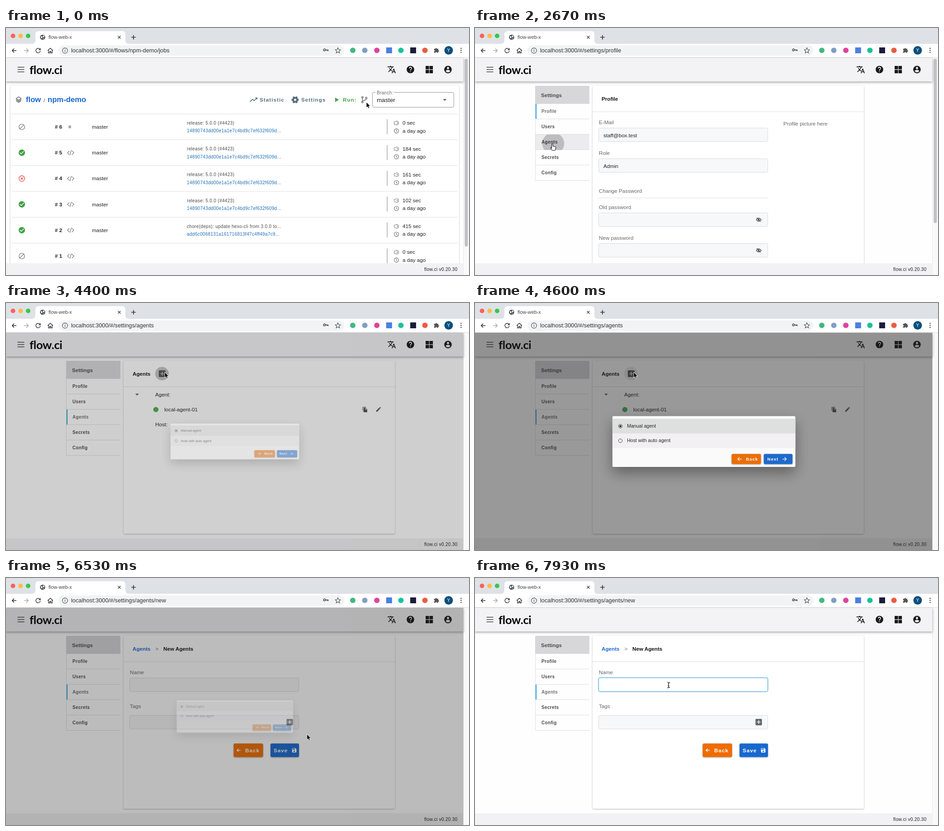
These frames come from a looping animation (1024x547 px, 8 s). An HTML page:

```html
<!DOCTYPE html>
<html lang="en">
<head>
<meta charset="utf-8">
<title>flow-web-x</title>
<style>
html, body { margin: 0; width: 100%; height: 100%; overflow: hidden; background: #fff; }
svg { display: block; width: 1024px; height: 547px; }
text { font: 11.67px "Liberation Sans", Arial, sans-serif; fill: #222; white-space: pre; }
text.cap { font-size: 10px; letter-spacing: .033em; }
text.b { font-weight: 700; }
text.sp { font-weight: 700; letter-spacing: .0893em; }
text.dense { font-size: 10.83px; }
text.url { font-size: 12.8px; fill: #333; }
text.label { fill: #666; }
text.logo { font: 700 25.5px Lato, sans-serif; letter-spacing: -.3px; fill: #000; }
.card { filter: drop-shadow(0 1px 1.5px rgba(0,0,0,.3)); }
.bar { filter: drop-shadow(0 2px 2.5px rgba(0,0,0,.36)); }
.pop { filter: drop-shadow(0 4px 5px rgba(0,0,0,.32)); }
.btn { filter: drop-shadow(0 1px 1.5px rgba(0,0,0,.35)); }

.step, .tween { animation: 8s infinite; }
.step { opacity: 0; animation-timing-function: step-end; }
.tween { animation-timing-function: linear; }

.list { animation-name: list; }
.profile { animation-name: profile; }
.agents { animation-name: agents; }
.new { animation-name: new; }
@keyframes list { 0% { opacity: 1 } 21.25%, 100% { opacity: 0 } }
@keyframes profile { 0% { opacity: 0 } 21.25% { opacity: 1 } 35%, 100% { opacity: 0 } }
@keyframes agents { 0% { opacity: 0 } 35% { opacity: 1 } 81.6%, 100% { opacity: 0 } }
@keyframes new { 0% { opacity: 0 } 81.6%, 100% { opacity: 1 } }

.account { animation-name: account; }
@keyframes account { 0%, 9.5% { opacity: 0 } 10.6%, 21.3% { opacity: 1 } 23%, 100% { opacity: 0 } }
.menu { animation-name: menu; transform-origin: 1001px 116px; }
@keyframes menu {
  0%, 11.8% { opacity: 0; transform: scale(.6) }
  12.6% { opacity: .8; transform: scale(.92) }
  14%, 20.6% { opacity: 1; transform: none }
  22.6%, 100% { opacity: 0; transform: none }
}
.item-hover { animation-name: itemHover; }
@keyframes itemHover { 0% { opacity: 0 } 15.6%, 100% { opacity: 1 } }
.ripple-menu { animation-name: rippleMenu; transform-origin: 971px 173px; }
@keyframes rippleMenu {
  0%, 18% { opacity: 0; transform: scale(.3) }
  19.1% { opacity: 1; transform: none }
  20.8% { opacity: 1; transform: scale(3.4) }
  22.6%, 100% { opacity: 0; transform: scale(3.6) }
}
.side-hover { animation-name: sideHover; }
@keyframes sideHover { 0%, 29.5% { opacity: 0 } 30.6%, 44.4% { opacity: 1 } 46%, 100% { opacity: 0 } }
.ripple-side { animation-name: rippleSide; transform-origin: 173px 256px; }
@keyframes rippleSide {
  0%, 32.4% { opacity: 0; transform: scale(.3) }
  33.4% { opacity: 1; transform: none }
  35.3% { opacity: 1; transform: scale(3.8) }
  37.5%, 100% { opacity: 0; transform: scale(4) }
}
.plus-hover { animation-name: plusHover; }
@keyframes plusHover { 0%, 51.2% { opacity: 0 } 52.5%, 55% { opacity: 1 } 59%, 100% { opacity: 0 } }
.shade { animation-name: shade; }
@keyframes shade {
  0%, 54.5% { opacity: 0 } 55% { opacity: .21 } 55.9% { opacity: .4 }
  57%, 80.9% { opacity: .46 } 82.2% { opacity: .18 } 83.4% { opacity: .05 } 84.2%, 100% { opacity: 0 }
}
.dialog { animation-name: dialog; transform-origin: 506px 306.5px; }
@keyframes dialog {
  0%, 54.5% { opacity: 0; transform: scale(.5) }
  55% { opacity: .42; transform: scale(.683) }
  55.9% { opacity: .84; transform: scale(.92) }
  58.2%, 80.5% { opacity: 1; transform: none }
  81.4% { opacity: .3; transform: scale(.65) }
  82.6%, 100% { opacity: 0; transform: scale(.5) }
}
.focus { animation-name: focus; }
@keyframes focus { 0%, 98.1% { opacity: 0 } 98.8%, 100% { opacity: 1 } }

.cursor { animation-name: cursor; animation-timing-function: ease-in-out; }
@keyframes cursor {
  0%, .8% { transform: translate(797px, 165px) }
  9.8%, 12.2% { transform: translate(977px, 94px) }
  17%, 22% { transform: translate(975px, 177px) }
  30.5%, 43.6% { transform: translate(171px, 258px) }
  52%, 64% { transform: translate(351px, 154px) }
  75% { transform: translate(651px, 328px) }
  78.2%, 80.8% { transform: translate(664px, 346px) }
  83.4%, 87.5% { transform: translate(671px, 350px) }
  96.3%, 100% { transform: translate(428px, 237px) }
}
.arrow { animation-name: arrow; }
.hand { animation-name: hand; }
.beam { animation-name: beam; }
@keyframes arrow {
  0% { opacity: 1 } 9.3% { opacity: 0 } 21.7% { opacity: 1 } 30% { opacity: 0 }
  44.4% { opacity: 1 } 77% { opacity: 0 } 81.6% { opacity: 1 } 94.6%, 100% { opacity: 0 }
}
@keyframes hand {
  0% { opacity: 0 } 9.3% { opacity: 1 } 21.7% { opacity: 0 } 30% { opacity: 1 }
  44.4% { opacity: 0 } 77% { opacity: 1 } 81.6%, 100% { opacity: 0 }
}
@keyframes beam { 0% { opacity: 0 } 94.6%, 100% { opacity: 1 } }
</style>
</head>
<body>
<svg id="stage" viewBox="0 0 1024 547"></svg>
<script>
const BLUE = '#1868cf', ORANGE = '#ef6c00', GREEN = '#43a047', GREY = '#6b6b6b', LINE = '#dedee0';
const MAIL = 'staff@box.test';

// Icons on a 24 unit grid
const solid = {
  user: 'M12 2a10 10 0 1 0 0 20 10 10 0 0 0 0-20zm0 3a3 3 0 1 1 0 6 3 3 0 0 1 0-6zm0 14.2c-2.5 0-4.7-1.3-6-3.2 0-2 4-3.1 6-3.1s6 1.1 6 3.1c-1.3 1.9-3.5 3.2-6 3.2z',
  help: 'M12 2a10 10 0 1 0 0 20 10 10 0 0 0 0-20zm1 17h-2v-2h2zm2-7.8l-.9 1C13.5 12.9 13 13.5 13 15h-2v-.5c0-1.1.5-2.1 1.2-2.8l1.2-1.3A2 2 0 1 0 10 9H8a4 4 0 1 1 7 2.2z',
  translate: 'M12.9 15.1l-2.6-2.5C12.1 10.600 13.400 8.400 14.100 6H17V4h-7V2H8v2H1v2h11.200C11.500 7.900 10.400 9.800 9 11.400 8.100 10.300 7.300 9.200 6.700 8h-2c.7 1.600 1.700 3.200 3 4.600l-5.100 5L4 19l5-5 3.100 3.100zM18.500 10h-2L12 22h2l1.100-3h4.800L21 22h2zm-2.600 7l1.600-4.300 1.600 4.300z',
  apps: 'M2.500 2.500h9v9h-9zM12.800 2.500h9v9h-9zM2.500 12.800h9v9h-9zM12.800 12.800h9v9h-9z',
  trend: 'M16 6l2.300 2.300-4.900 4.900-4-4L2 16.600 3.400 18l6-6 4 4 6.300-6.300L22 12V6z',
  play: 'M7 4v16l13-8z',
  caret: 'M7 10l5 5 5-5z',
  check: 'M12 2a10 10 0 1 0 0 20 10 10 0 0 0 0-20zm-2 15l-5-5 1.400-1.400 3.600 3.600 7.600-7.600L19 8z',
  plus: 'M5 3h14a2 2 0 0 1 2 2v14a2 2 0 0 1-2 2H5a2 2 0 0 1-2-2V5a2 2 0 0 1 2-2zm6 4v4H7v2h4v4h2v-4h4v-2h-4V7z',
  copy: 'M16 1H4a2 2 0 0 0-2 2v14h2V3h12zM15 5H8a2 2 0 0 0-2 2v14a2 2 0 0 0 2 2h11a2 2 0 0 0 2-2V11zm-1 7V6.500l5.500 5.500z',
  pencil: 'M3 17.200V21h3.800L17.800 9.900l-3.700-3.700zM20.700 7a1 1 0 0 0 0-1.400l-2.300-2.300a1 1 0 0 0-1.400 0l-1.900 1.800 3.800 3.800z',
  save: 'M17 3H5a2 2 0 0 0-2 2v14a2 2 0 0 0 2 2h14a2 2 0 0 0 2-2V7zm-5 16a3 3 0 1 1 0-6 3 3 0 0 1 0 6zm3-10H5V5h10z',
  puzzle: 'M3 6h5a3 3 0 1 1 6 0h5v5a3 3 0 1 1 0 6v4h-5a2.500 2.500 0 0 0-5 0H3v-5a2.500 2.500 0 0 0 0-5z'
};
const outline = {
  left: 'M20 12H5M12 5l-7 7 7 7',
  right: 'M4 12h15M12 5l7 7-7 7',
  reload: 'M19 7a8.500 8.500 0 1 0 1.500 6M20.500 3v6h-6',
  home: 'M2 12L12 3l10 9M5 10v11h5v-6h4v6h5V10',
  close: 'M5 5l14 14M19 5L5 19',
  add: 'M12 3v18M3 12h18',
  burger: 'M2 5h20M2 12h20M2 19h20',
  layers: 'M12 3l9 6-9 6-9-6zM3 13l9 6 9-6M3 17l9 6 9-6',
  code: 'M8 6l-6 6 6 6M16 6l6 6-6 6M14 4l-4 16',
  branch: 'M6 7v10M18 9c0 5-9 3-11.500 8M3.500 4.500a2.500 2.500 0 1 0 5 0 2.500 2.500 0 1 0-5 0M15.500 6.500a2.500 2.500 0 1 0 5 0 2.500 2.500 0 1 0-5 0M3.500 19.500a2.500 2.500 0 1 0 5 0 2.500 2.500 0 1 0-5 0',
  ban: 'M2 12a10 10 0 1 0 20 0 10 10 0 1 0-20 0M19 5L5 19',
  fail: 'M2 12a10 10 0 1 0 20 0 10 10 0 1 0-20 0M8 8l8 8M16 8l-8 8',
  clock: 'M3 12a9 9 0 1 0 18 0 9 9 0 1 0-18 0M12 7v5l4 3',
  fast: 'M8 6a8 8 0 1 1 0 12M15 8v5l3 1M1 7h6M0 12h5M1 17h6',
  logout: 'M16 7V2H3v20h13v-5M9 12h13M18 8l4 4-4 4',
  eye: 'M1 12q11-14 22 0q-11 14-22 0M9 12a3 3 0 1 0 6 0 3 3 0 1 0-6 0M3 3l18 18',
  globe: 'M3 12a9 9 0 1 0 18 0 9 9 0 1 0-18 0',
  star: 'M12 2l3 7 7 .6-5.400 4.900L18.300 22 12 18l-6.300 4 1.700-7.500L2 9.600 9 9z',
  key: 'M3 12a4 4 0 1 0 8 0 4 4 0 1 0-8 0M11 12h11v5M17 12v4',
  info: 'M2 12a10 10 0 1 0 20 0 10 10 0 1 0-20 0M12 10v7M12 6v2'
};

const rect = (x, y, w, h, fill, attr = '') => `<rect x="${x}" y="${y}" width="${w}" height="${h}" fill="${fill}" ${attr}/>`;
const dot = (x, y, r, fill, attr = '') => `<circle cx="${x}" cy="${y}" r="${r}" fill="${fill}" ${attr}/>`;
const text = (x, y, s, cls = '', fill = '') => `<text x="${x}" y="${y}" class="${cls}" ${fill && `style="fill:${fill}"`}>${s}</text>`;
const group = (cls, ...parts) => `<g class="${cls}">${parts.join('')}</g>`;
const line = (x, y, x2, y2, c = LINE, w = 1) => `<path d="M${x} ${y}L${x2} ${y2}" stroke="${c}" stroke-width="${w}"/>`;
const icon = (name, cx, cy, size, color, w = 2) => {
  const k = size / 24;
  const paint = solid[name] ? `fill="${color}" fill-rule="evenodd"` : `fill="none" stroke="${color}" stroke-width="${w}"`;
  return `<path d="${solid[name] || outline[name]}" ${paint} transform="translate(${cx - size / 2} ${cy - size / 2}) scale(${k})"/>`;
};
const gear = (x, y, r, c) =>
  dot(x, y, r * .57, 'none', `stroke="${c}" stroke-width="${r * .5}"`) +
  dot(x, y, r * .86, 'none', `stroke="${c}" stroke-width="${r * .28}" pathLength="12" stroke-dasharray="1 1" stroke-dashoffset=".5"`);
const button = (x, y, w, h, fill) => rect(x, y, w, h, fill, 'rx="3" class="btn"');
const input = (y, h = 31) => rect(273.5, y + .5, 374, h - 1, '#f7f8f9', 'rx="3" stroke="#d9dadd"');

function browser() {
  const lights = ['#fc605b', '#fdbc40', '#34c84a'].map((c, i) => dot(15.500 + i * 16.700, 17.500, 5, c)).join('');
  const addons = ['#41b883', '#7f9fc4', '#e0439b', '#4a80e0', '#15c39a', '#1c1d3c', '#ec5b3f'].map((c, i) => {
    const x = 767 + i * 26.600;
    return i === 3 || i === 5 ? rect(x - 6, 43, 13, 13, c) : dot(x, 49.500, 6, c);
  }).join('');
  return rect(0, 0, 1024, 547, '#fefefe') + rect(0, 0, 1024, 36, '#dee1e6') + lights +
    '<path d="M57 35q8 0 8-8V14q0-7 7-7H257q7 0 7 7v13q0 8 8 8z" fill="#fff"/>' +
    rect(0, 35, 1024, 30, '#fff') + line(0, 65.500, 1024, 65.500, '#dadbdd') +
    dot(81, 20.500, 5.800, '#50555a') + '<path d="M77 18l4 1-1 3-2 1zM82 16l3 2-1 3-2-1zM82 23h2l-2 2z" fill="#fff"/>' +
    text(94, 24.300, 'flow-web-x', 'dense', '#444') + icon('close', 250.500, 20.500, 10, '#444', 3.200) + icon('add', 282, 20.500, 13, '#333', 3) +
    icon('left', 18, 50, 15, '#333', 2.400) + icon('right', 45, 50, 15, '#aaa', 2.400) +
    icon('reload', 71, 50, 14, '#333', 2.400) + icon('home', 98, 50, 14, '#333', 2.400) +
    rect(116, 38.500, 632, 23, '#f1f3f4', 'rx="11.500"') + icon('info', 130.500, 50, 14, '#555') +
    icon('key', 707, 48.500, 13, '#444', 2.800) + icon('star', 734, 49.500, 14, '#555') + addons +
    icon('puzzle', 952, 49.500, 14, '#555') + dot(979, 49.500, 9.500, '#0b4f7d') + text(975.500, 53.200, 'Y', 'cap', '#fff') +
    [45, 49.500, 54].map(y => dot(1006.500, y, 1.300, '#444')).join('') +
    rect(1011.500, 66, 12.500, 481, '#f9f9fa') + line(1011.500, 66, 1011.500, 547, '#e8e8ea');
}

const url = path => text(144, 54, 'localhost:3000/#/' + path, 'url');
const thumb = end => rect(1014.500, 68, 7, end - 68, '#c1c1c3', 'rx="3.500"');

function jobs() {
  const hash = '14890743dd00e1a1e7c4bd9c7ef632f609d...', release = 'release: 5.0.0 (#4423)';
  const rows = [
    ['ban', 0, release, hash], ['check', 184, release, hash], ['fail', 161, release, hash], ['check', 102, release, hash],
    ['check', 415, 'chore(deps): update hexo-cli from 3.0.0 to...', 'add6c0068131a161716813f47c4ff49a7c9...'], ['ban', 0, '', '']
  ];
  const colors = { ban: GREY, check: GREEN, fail: '#e53935' };
  return rows.map(([state, secs, note, sha], i) => {
    const y = 219 + i * 57.200;
    return line(13, y - 28.700, 998, y - 28.700) +
      icon(state, 35, y, state === 'check' ? 17 : 15, colors[state], 1.900) +
      text(108, y + 4, '# ' + (6 - i), 'b') +
      (i ? icon('code', 143, y, 17, '#777', 1.700) : icon('burger', 141, y, 7, '#555', 3.500)) +
      (note && text(190, y + 4, 'master')) +
      text(400, y - 5, note, 'cap', '#4a4a4a') + text(400, y + 12.300, sha, 'cap', '#1e6fb8') +
      line(843, y - 17, 843, y + 16, '#a9a9ab', 1.500) +
      icon('fast', 863.500, y - 8.500, 12.500, '#666') + icon('clock', 863.500, y + 9, 13, '#666') +
      text(877, y - 4.700, secs + ' sec') + text(877, y + 12.600, 'a day ago');
  }).join('');
}

const listPage = () => group('step list', url('flows/npm-demo/jobs'), thumb(484),
  rect(10, 128, 992, 420, '#fff', 'rx="3" class="card"'),
  icon('layers', 28, 158, 15, '#666'),
  `<g style="--s:0">${text(44, 164, '<tspan font-weight="700" font-size="16.67">flow</tspan>', '', BLUE)}</g>`,
  text(83, 164, '/', '', '#444'),
  text(92, 164, '<tspan font-weight="700" font-size="16.67">npm-demo</tspan>', '', BLUE),
  icon('trend', 547.500, 159, 20, '#546e7a'), text(561, 163, 'Statistic', 'sp', '#546e7a'),
  gear(639.500, 159, 8, '#546e7a'), text(653, 163, 'Settings', 'sp', '#546e7a'),
  icon('play', 731, 159, 15, GREEN), text(745, 163, 'Run:', 'sp', GREEN),
  icon('branch', 792.500, 159, 17, '#666'),
  rect(810.500, 142.500, 180, 33, '#fff', 'rx="3.500" stroke="#939395"'),
  rect(817, 140, 41, 5, '#fff'), text(820, 146.500, 'Branch:', 'cap', '#666'),
  `<text x="820" y="163.500" style="font-size:13.330px">master</text>`, icon('caret', 970.500, 159, 20, '#666'), jobs());

function sidebar(active) {
  const items = ['Profile', 'Users', 'Agents', 'Secrets', 'Config'];
  return rect(133, 128, 120, 40, '#d7d6d9') + text(146, 152.500, 'Settings', 'b', '#4a4a4c') +
    items.map((name, i) => {
      const y = 168 + i * 34, on = name === active;
      return line(133, y + 33.500, 253, y + 33.500) +
        (name === 'Agents' ? rect(134, y, 119, 33, '#ececee', 'class="tween side-hover"') : '') +
        (on ? rect(133, y, 3, 33, '#2aa3dc') : '') + text(147, y + 20, name, 'cap b', on ? '#6d6d6f' : '#4a4a4c');
    }).join('') + line(133.500, 168, 133.500, 338);
}
const panel = h => rect(260, 128, 600, h, '#fff', 'rx="3" class="card"') + line(260, 185.500, 860, 185.500);
const ripple = (cls, x, y, r, clip) => `<g clip-path="url(#${clip})">${dot(x, y, r, 'rgba(0,0,0,.2)', `class="tween ${cls}"`)}</g>`;

const profilePage = () => group('step profile', url('settings/profile'), thumb(432), sidebar('Profile'), panel(430),
  text(280, 161, 'Profile', 'b', '#111'), text(682, 215.500, 'Profile picture here', 'label'),
  text(274, 212.500, 'E-Mail', 'label'), input(221), text(284, 241.500, MAIL),
  text(274, 280.500, 'Role', 'label'), input(289), text(284, 309.500, 'Admin'),
  text(274, 365, 'Change Password', 'label'), line(273, 376.500, 648, 376.500),
  text(274, 400.500, 'Old password', 'label'), input(409), icon('eye', 627.500, 424.500, 12, '#555', 2.600),
  text(274, 468.500, 'New password', 'label'), input(477), icon('eye', 627.500, 492.500, 12, '#555', 2.600));

const agentsPage = () => group('step agents', url('settings/agents'), sidebar('Agents'), panel(383),
  text(280, 161, 'Agents', 'b', '#111'), dot(345, 156.500, 15, 'rgba(0,0,0,.24)', 'class="tween plus-hover"'),
  icon('plus', 345.500, 156.500, 20, '#555'),
  icon('caret', 290, 202.500, 20, '#666'), text(330, 206.500, 'Agent:'), dot(331.500, 236, 5.800, '#4caf50'),
  text(350, 240, 'local-agent-01'), icon('copy', 794, 236, 13, '#555'), icon('pencil', 824, 235.500, 14, '#555'),
  text(330, 272.500, 'Host:'));

const newPage = () => group('step new', url('settings/agents/new'), sidebar('Agents'), panel(383),
  text(280, 161, 'Agents', 'b', BLUE), text(330.500, 161, '&gt;', '', '#666'), text(348, 161, 'New Agents', 'b', '#111'),
  text(274, 212.500, 'Name', 'label'), input(221),
  rect(273.500, 221, 374, 30.500, '#fff', 'rx="3" stroke="#3fa3dc" class="tween focus" style="filter:drop-shadow(0 0 1.500px #8fcdf0)"'),
  text(274, 288, 'Tags', 'label'), input(304), icon('plus', 627.500, 319, 19, '#666'),
  button(503.500, 366.500, 65, 30, ORANGE), icon('left', 514.500, 381.500, 13, '#fff', 2.400), text(529, 385.500, 'Back', 'sp', '#fff'),
  button(585, 366.500, 63, 30, BLUE), text(592, 385.500, 'Save', 'sp', '#fff'), icon('save', 637.500, 381.500, 13, '#fff'));

const header = () => rect(0, 66, 1011.500, 52.500, '#f3f2f4', 'class="bar"') +
  icon('burger', 33, 92, 18, '#444', 1.900) + text(52, 101.500, 'flow.ci', 'logo') +
  rect(957, 80, 41, 24, '#dddcde', 'rx="3" class="tween account"') +
  ['translate', 'help', 'apps', 'user'].map((n, i) => icon(n, 853 + i * 41.500, 92, 20, '#161616')).join('') +
  rect(0, 521, 1011.500, 26, '#f2f1f3') + text(925, 538, 'flow.ci v0.20.30', 'cap');

const menu = () => group('tween menu',
  rect(906, 116, 95, 117, '#fff', 'rx="3" class="pop"'), text(920, 142.500, MAIL, 'cap', '#777'),
  rect(913, 156.500, 82, 33, '#eeeef0', 'rx="2" class="step item-hover"'), gear(929.500, 173.500, 8, '#666'),
  ripple('ripple-menu', 971, 173, 17, 'item'), text(949, 177, 'Settings', 'dense'),
  icon('logout', 929, 209.500, 16, '#666'), text(949, 213.500, 'Logout', 'dense'));

const radio = (y, on) => dot(317, y, 4.300, 'none', 'stroke="#333"') + (on ? dot(317, y, 2.400, '#222') : '');
const dialog = () => group('tween dialog',
  rect(299, 249, 414.500, 115.500, '#fff', 'rx="3" style="filter:drop-shadow(0 14px 16px rgba(0,0,0,.38))"'),
  rect(299, 255, 414.500, 33.500, '#e2e3e3'), rect(299, 288.500, 414.500, 33, '#f7f5f8'),
  radio(272, true), text(332, 275.500, 'Manual agent', 'dense'), radio(305, false), text(332, 308.500, 'Host with auto agent', 'dense'),
  button(569, 335, 66.500, 23, ORANGE), icon('left', 587, 346.500, 14, '#fff', 2.200), text(601.500, 350, 'Back', 'cap sp', '#fff'),
  button(642, 335, 65, 23, BLUE), text(650, 350, 'Next', 'cap sp', '#fff'), icon('right', 689, 346.500, 14, '#fff', 2.200));

const cursor = () => group('tween cursor',
  '<path class="step arrow" d="M0 -1V11.500L2.800 9 4.700 13.300 6.800 12.400 5 8.200H8.700z" fill="#000" stroke="#fff" stroke-width=".9"/>',
  '<path class="step hand" d="M-1.500 9V0q0-1.600 1.300-1.600T1.200 0V4q1.600-.8 2.400.5 1.400-.6 2.200.6 1.900-.3 1.900 1.400 0 4-1.800 6.500H-.5Q-2 10.500-4.300 7.800q-.2-2 2.800 0z" fill="#fff" stroke="#000"/>',
  '<path class="step beam" d="M-2.800-6.500Q0-6.500 0-4.500T2.800-6.500M0-5V5M-2.800 6.500Q0 6.500 0 4.500T2.800 6.500M-1.500 1h3" fill="none" stroke="#111" stroke-width="1.200"/>');

document.getElementById('stage').innerHTML =
  `<clipPath id="item">${rect(913, 156.500, 82, 33, '#fff')}</clipPath><clipPath id="side">${rect(134, 236, 119, 33.500, '#fff')}</clipPath>` +
  browser() + listPage() + profilePage() + agentsPage() + newPage() + ripple('ripple-side', 173, 256, 24.500, 'side') + header() +
  rect(0, 66, 1011.500, 481, '#212121', 'class="tween shade"') + menu() + dialog() + cursor();
</script>
</body>
</html>
```
